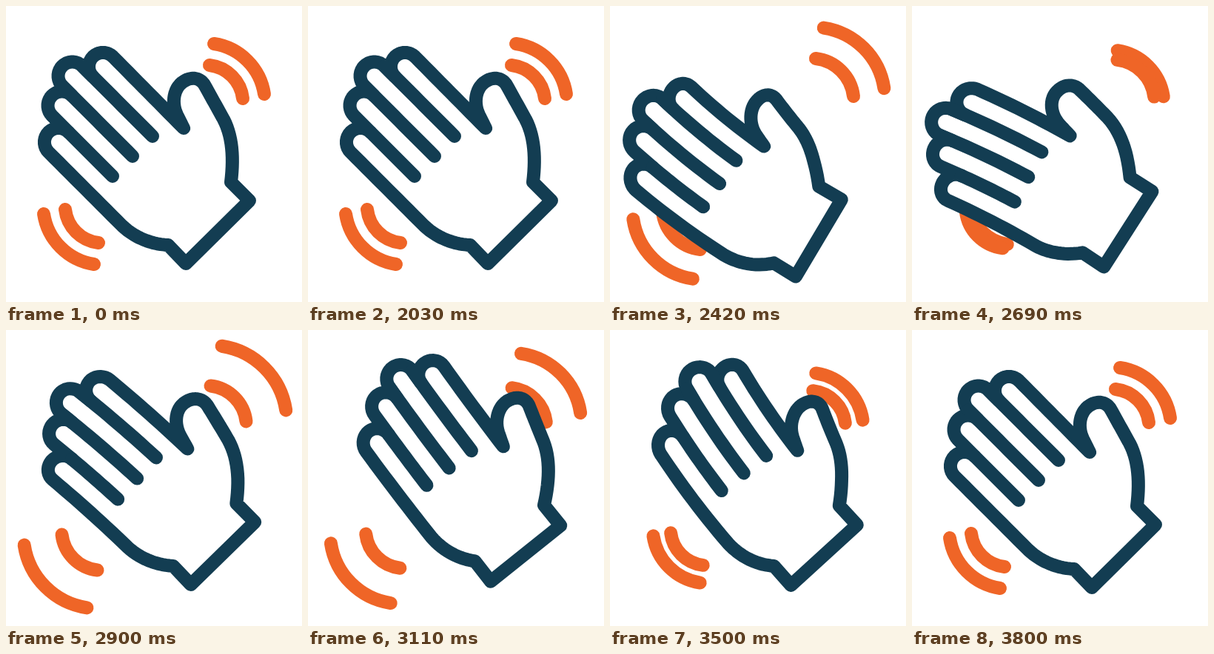
Animation of 400x400 px, one loop 3.83 s. Source, as an HTML page with a canvas:

```html
<!DOCTYPE html>
<html lang="en">
<head>
<meta charset="utf-8">
<title>Waving hand</title>
<style>
  html, body { margin: 0; width: 100%; height: 100%; overflow: hidden; background: #fff; }
  canvas { display: block; width: 400px; height: 400px; }
</style>
</head>
<body>
<canvas id="stage" width="400" height="400"></canvas>
<script>
const ctx = document.getElementById('stage').getContext('2d');
const NAVY = '#133d52', ORANGE = '#ef6527', LINE = 18;
const LOOP = 3830, START = 2030, END = 3800, STEP = 30;
const DIAG = Math.SQRT1_2;

// Eases from rest through the turning points [time, value] and back to rest
const swing = (...turns) => t => {
  const keys = [[START, 0], ...turns, [END, 0]];
  const i = keys.findIndex(key => t < key[0]);
  if (i < 1) return 0;
  const [t0, from] = keys[i - 1], [t1, to] = keys[i];
  return from + (to - from) * (0.5 - 0.5 * Math.cos(Math.PI * (t - t0) / (t1 - t0)));
};

const turn = swing([2540, -16.8], [3080, 6]);
const slideX = swing([2420, -4], [2690, 6], [3110, 8]);
const slideY = swing([2420, 8], [2690, -4], [3110, -3.5]);
const bend = swing([2420, 18.6], [2720, -15], [3430, 20]);

// Spread of the motion lines
const outerTop = swing([2290, 1], [2670, -0.3], [2950, 1], [3370, -0.29]);
const outerLow = swing([2310, 1], [2670, -0.85], [2960, 1], [3370, -0.29]);
const inner = swing([2420, 1], [2690, 0.8], [3110, 0.2], [3450, -0.25]);

// Hand at rest, as dense point lists
const points = (n, at) => Array.from({ length: n + 1 }, (_, i) => at(i / n));
const line = (x1, y1, x2, y2) => points(14, p => [x1 + (x2 - x1) * p, y1 + (y2 - y1) * p]);
const curve = (x0, y0, x1, y1, x2, y2, x3, y3) => points(14, p => {
  const m = 1 - p;
  const mix = (a, b, c, d) => m * m * m * a + 3 * m * m * p * b + 3 * m * p * p * c + p * p * p * d;
  return [mix(x0, x1, x2, x3), mix(y0, y1, y2, y3)];
});
const cap = (x, y) => points(18, p => {
  const a = Math.PI * (0.75 + p);
  return [x + 19.1 * Math.cos(a), y + 19.1 * Math.sin(a)];
});

const outline = [
  ...curve(219, 323, 196, 322, 174, 313, 157, 297),
  ...line(157, 297, 57.5, 197.5),
  ...cap(71, 184), ...cap(75.6, 134.6), ...cap(89.6, 94.6), ...cap(131, 82),
  ...line(144.5, 68.5, 240, 165),
  ...curve(240, 165, 231, 147, 231, 147, 231, 147),
  ...curve(231, 147, 223, 130, 227, 110, 240, 102),
  ...curve(240, 102, 252, 94, 264, 98, 269, 108),
  ...line(269, 108, 294, 153),
  ...curve(294, 153, 306, 176, 308, 205, 304, 238),
  [329, 263], [243, 348]
];
const creases = [
  line(84.5, 170.5, 144, 230),
  line(76, 108, 171, 203),
  line(103, 81, 198, 176)
];

// Maps a resting point to its place at time t: bend the fingers, then turn about the wrist
function poser(t) {
  const deg = turn(t), angle = deg * Math.PI / 180, b = bend(t);
  const cos = Math.cos(angle), sin = Math.sin(angle);
  const wx = 286 + slideX(t), wy = 306 + slideY(t);
  return ([px, py]) => {
    const x = px - 286, y = py - 306, reach = 196;
    let u = -(x + y) * DIAG, v = (x - y) * DIAG;
    const w = Math.max(0, u - 57) / reach;
    u += 0.28 * deg * w - 80 * Math.tanh(v / 80) * 2 * b * w / reach;
    v += b * w * w;
    const bx = (v - u) * DIAG, by = -(u + v) * DIAG;
    return [wx + bx * cos - by * sin, wy + bx * sin + by * cos];
  };
}

function trace(list, pose) {
  ctx.beginPath();
  for (const point of list) ctx.lineTo(...pose(point));
}

// Each arc is symmetric about the falling diagonal; the low ones swap x and y
function drawArc(x, y, ratio, low) {
  const ex = 400 - y, ey = 400 - x;
  const r = Math.hypot(ex - x, ey - y) * ratio;
  ctx.stroke(new Path2D(low
    ? `M${y} ${x}A${r} ${r} 0 0 0 ${ey} ${ex}`
    : `M${x} ${y}A${r} ${r} 0 0 1 ${ex} ${ey}`));
}

function draw(t) {
  ctx.fillStyle = '#fff';
  ctx.fillRect(0, 0, 400, 400);
  ctx.lineWidth = LINE;
  ctx.lineCap = ctx.lineJoin = 'round';

  ctx.strokeStyle = ORANGE;
  for (const low of [false, true]) {
    const far = low ? outerLow(t) : outerTop(t), near = inner(t);
    drawArc(281 + 11.8 * far, 51 - 32.5 * far, 0.843, low);
    drawArc(275 + 3 * near, 80 - 9 * near, 0.806, low);
  }

  const pose = poser(t);
  ctx.strokeStyle = NAVY;
  trace(outline, pose);
  ctx.closePath();
  ctx.fill();
  ctx.stroke();
  for (const crease of creases) {
    trace(crease, pose);
    ctx.stroke();
  }
}

const begin = performance.now();
function tick() {
  const t = (performance.now() - begin) % LOOP;
  draw(START + Math.floor((t - START) / STEP) * STEP);
  requestAnimationFrame(tick);
}
tick();
</script>
</body>
</html>
```
